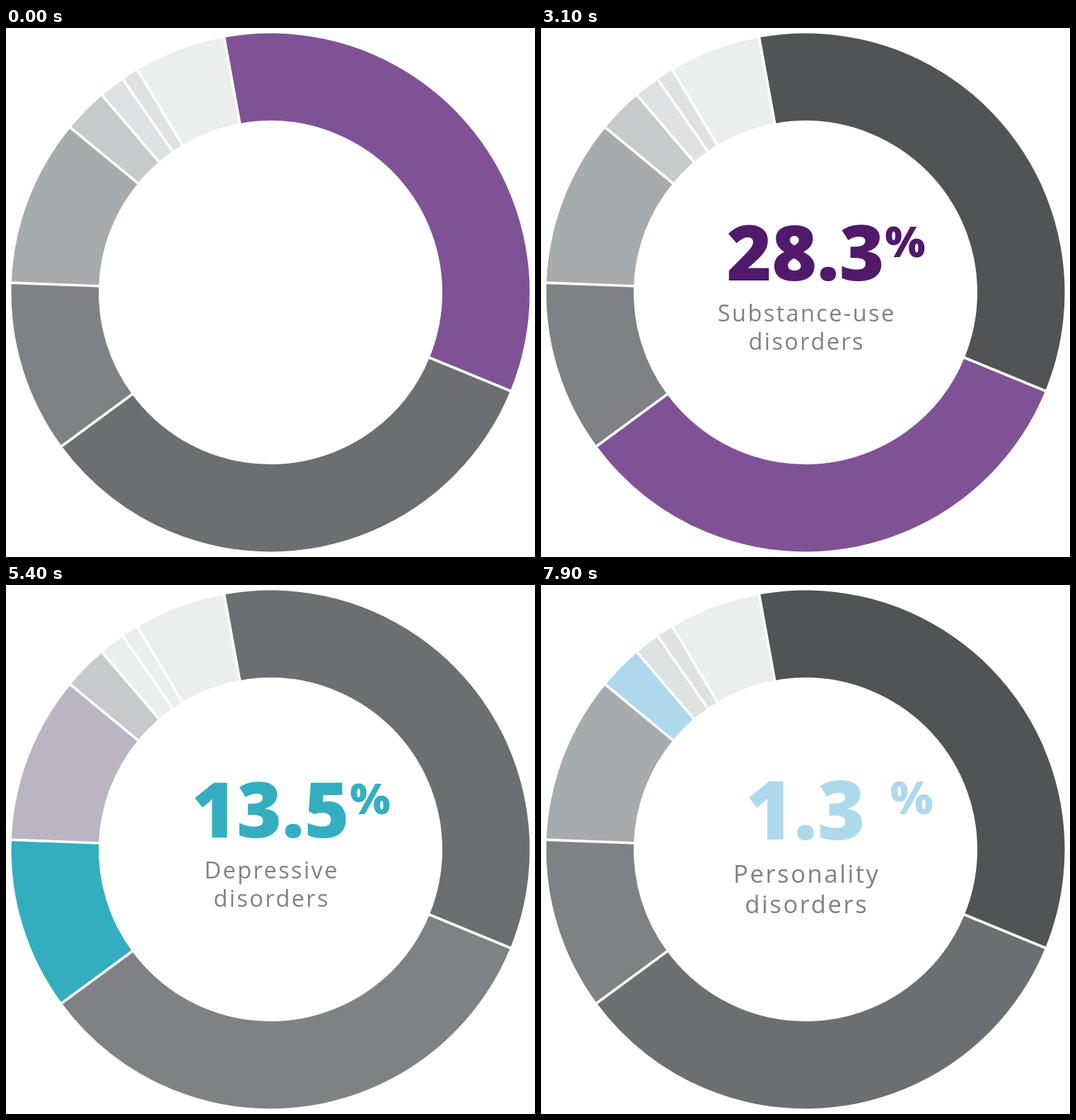
These frames come from a looping animation (748x748 px, 8 s). An HTML page with a canvas:

```html
<!DOCTYPE html>
<html lang="en">
<head>
<meta charset="utf-8">
<title>Share of disorders</title>
<style>
html, body { margin: 0; width: 100%; height: 100%; overflow: hidden; background: #fff; }
canvas { display: block; width: 748px; height: 748px; }
</style>
</head>
<body>
<canvas id="stage" width="748" height="748"></canvas>
<script>
const ctx = document.getElementById('stage').getContext('2d');
const LOOP = 8000, STEP = 100;
const CENTER = 374, OUTER = 366.5, INNER = 243, TEXT_Y = 317.5;
const FONT = '"Open Sans", "Noto Sans", sans-serif';

// Slice borders in degrees, clockwise from the top.
const BORDERS = [-10.3, 112.3, 233.65, 272.15, 309.5, 319.5, 325.3, 329.15, 349.7];
const GREYS = ['#525355', '#6d6e71', '#808184', '#a7abad', '#c8c9cb', '#dee2e2', '#dee2e2', '#eceeed'];
const PURPLE = '#7f5296', TEAL = '#33aec0', BLUE = '#aed9ed', INK = '#50196a';
const PALETTE = [...new Set(GREYS), '#bbb5c3', '#f3f5f8', '#ffffff', PURPLE, TEAL, BLUE].map(rgb);

const SLIDES = [
  { start: 50, count: 1000, out: 1700, skip: 0, value: 31.6, color: PURPLE, ink: INK, spacing: 0,
    lines: ['Schizophrenia and', 'related disorders with', 'psychosis'] },
  { start: 2205, count: 995, out: 3700, skip: 0, value: 31.5, color: PURPLE, ink: INK, spacing: 2.4,
    lines: ['Substance-use', 'disorders'] },
  { start: 4105, count: 495, out: 5400, skip: 1, value: 13.5, color: TEAL, ink: TEAL, spacing: 2.4,
    lines: ['Depressive', 'disorders'] },
  { start: 5805, count: 595, out: 7400, skip: 1, value: 11.1, color: '#6d6e71', ink: '#6d6e71', spacing: 2.4,
    lines: ['Bipolar and', 'related disorders'] },
  { start: 7605, count: 1000, out: LOOP, skip: 0, value: 4.4, color: BLUE, ink: BLUE, spacing: 2.4,
    lines: ['Personality', 'disorders'] }
];

// Leaving: text scale and chart opacity per step.
const EXIT = [[1.135, 1], [1, 0.79], [0.335, 0.28]];
const POP = [[0, 0], [95, 0.52], [200, 1.15], [300, 1.06], [400, 1]];
const FADE = [[-150, 0], [0, 0.4], [95, 0.74], [200, 0.93], [300, 1]];

function rgb(hex) {
  return [1, 3, 5].map(i => parseInt(hex.slice(i, i + 2), 16));
}

function track(keys, t) {
  if (t <= keys[0][0]) return keys[0][1];
  for (let i = 1; i < keys.length; i++) {
    const [t0, v0] = keys[i - 1], [t1, v1] = keys[i];
    if (t < t1) return v0 + (v1 - v0) * (t - t0) / (t1 - t0);
  }
  return keys[keys.length - 1][1];
}

// Fades towards white in the steps of a limited palette.
function fade(hex, alpha) {
  const mixed = rgb(hex).map(c => 255 + (c - 255) * alpha);
  const distance = p => Math.hypot(...p.map((c, i) => c - mixed[i]));
  const best = PALETTE.reduce((a, b) => distance(b) < distance(a) ? b : a);
  return `rgb(${best.join()})`;
}

function drawChart(index, alpha) {
  const angle = i => (BORDERS[i] - 90) * Math.PI / 180;
  for (let i = 0; i < GREYS.length; i++) {
    const active = i === (index ? index - 0 : 0);
    const grey = GREYS[i];
    ctx.fillStyle = active ? fade(SLIDES[index].color, alpha ** 0.69) : fade(grey, alpha);
    ctx.beginPath();
    ctx.arc(CENTER, CENTER, OUTER, angle(i), angle(i + 1));
    ctx.arc(CENTER, CENTER, INNER, angle(i + 1), angle(i), true);
    ctx.fill();
  }
  ctx.strokeStyle = '#fff';
  ctx.lineWidth = 3.7;
  for (let i = 0; i < GREYS.length; i++) {
    const x = Math.cos(angle(i)), y = Math.sin(angle(i));
    ctx.beginPath();
    ctx.moveTo(CENTER + x * (INNER - 3), CENTER + y * (INNER - 3));
    ctx.lineTo(CENTER + x * (OUTER + 3), CENTER + y * (OUTER + 3));
    ctx.stroke();
  }
}

function write(text, x, y, weight, size, color, spacing = 0) {
  ctx.font = `${weight} ${size}px ${FONT}`;
  ctx.letterSpacing = spacing + 'px';
  ctx.fillStyle = color;
  ctx.fillText(text, x + spacing / 2, y);
}

function drawText(slide, scale, value) {
  if (scale <= 0) return;
  ctx.save();
  ctx.translate(CENTER, TEXT_Y);
  ctx.scale(scale, scale);
  ctx.textAlign = 'center';
  write(value.toFixed(1), 0, 39.5, 800, 109, slide.ink);
  write('%', 141, 6.5, 800, 60, slide.ink);
  slide.lines.forEach((line, i) =>
    write(line, 0.5, 97.5 + 40 * i, 500, 32.5, '#808184', slide.spacing));
  ctx.restore();
}

function render(t) {
  const index = SLIDES.findIndex(s => t < s.out + (EXIT.length - s.skip) * STEP);
  const slide = SLIDES[index], age = t - slide.start;
  let scale = track(POP, age);
  let alpha = index ? track(FADE, age) : 1;
  if (t >= slide.out) [scale, alpha] = EXIT[(t - slide.out) / STEP + slide.skip];
  const progress = Math.min(1, Math.max(0, age / slide.count));

  ctx.fillStyle = '#fff';
  ctx.fillRect(0, 0, 748, 748);
  drawChart(index, alpha);
  drawText(slide, scale, slide.value * progress);
}

// The animation advances in steps of a tenth of a second.
function tick() {
  render(Math.floor(performance.now() % LOOP / STEP) * STEP);
  requestAnimationFrame(tick);
}
tick();
</script>
</body>
</html>
```
